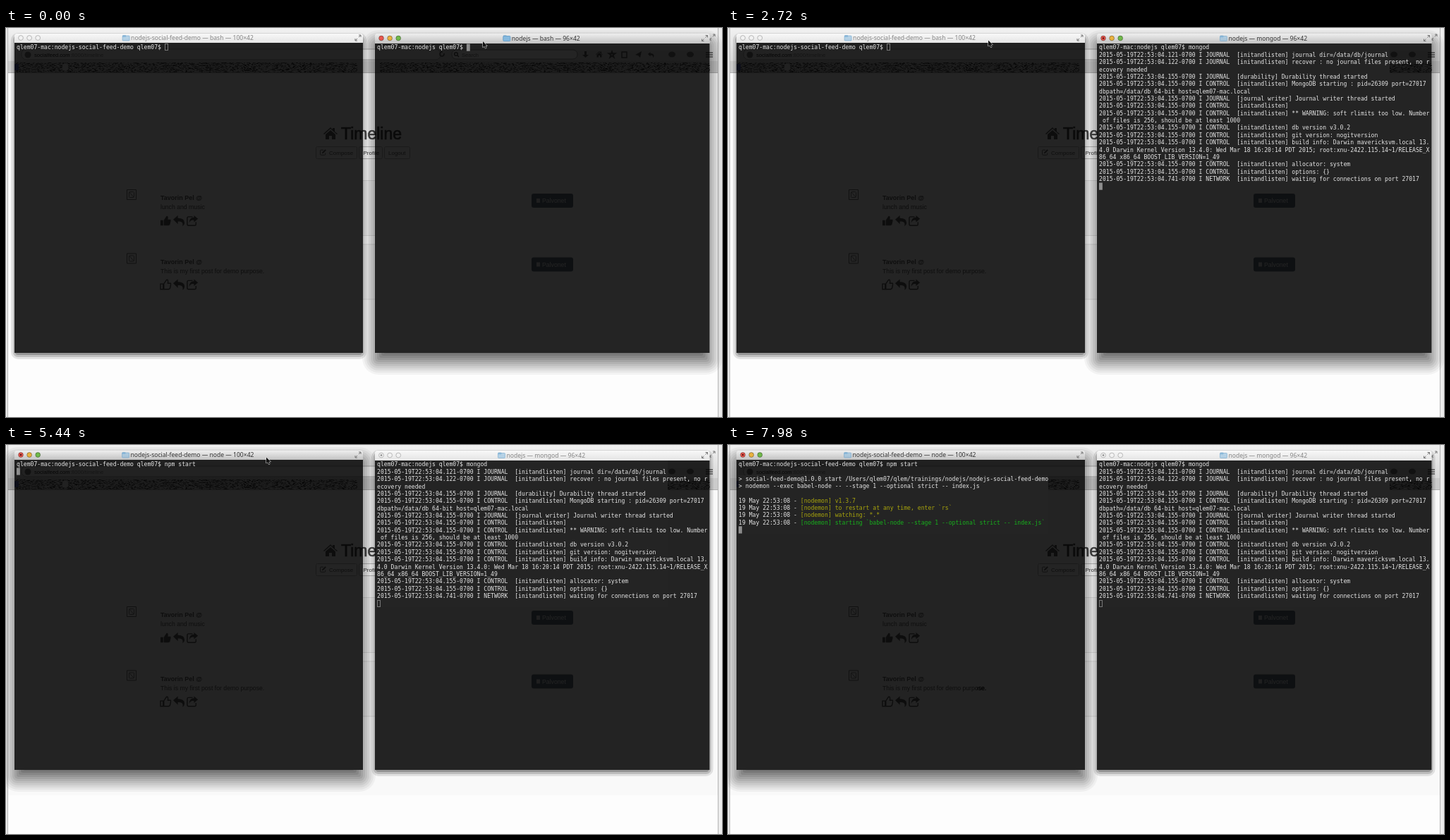
An HTML page with a canvas for the animation above (8000 ms loop, 1015 by 552 pixels).

```html
<!DOCTYPE html>
<html lang="en">
<head>
<meta charset="utf-8">
<title>Starting the demo</title>
<style>
  html, body { margin: 0; width: 100%; height: 100%; overflow: hidden; }
  canvas { display: block; }
</style>
</head>
<body>
<canvas id="stage" width="1015" height="552"></canvas>
<script>
const g = document.getElementById('stage').getContext('2d');
const LOOP = 8000, CELL = 4.88, ROW = 10.37, INK = '#5c5c5c';
const SANS = '"Liberation Sans", sans-serif';
const UI = '"Noto Sans", sans-serif';
const MONO = '8.1px "DejaVu Sans Mono", monospace';
const LEFT = { x: 12, w: 494, text: 15, y: 0 };
const RIGHT = { x: 523, w: 474.5, text: 526, y: 0.5 };
const TOP = 8, BOTTOM = 461;

// ---------- helpers ----------
function box(x, y, w, h, color) {
  g.fillStyle = color;
  g.fillRect(x, y, w, h);
}
function rounded(x, y, w, h, r, fill, stroke) {
  g.beginPath();
  g.roundRect(x, y, w, h, r);
  if (fill) { g.fillStyle = fill; g.fill(); }
  if (stroke) { g.strokeStyle = stroke; g.lineWidth = 1; g.stroke(); }
}
function label(str, x, y, font, color = INK, align = 'left') {
  g.font = font;
  g.fillStyle = color;
  g.textAlign = align;
  g.fillText(str, x, y);
}
function icon(d, x, y, scale, outline) {
  g.save();
  g.translate(x, y);
  g.scale(scale, scale);
  g.fillStyle = g.strokeStyle = INK;
  g.lineWidth = 1.5;
  g[outline ? 'stroke' : 'fill'](new Path2D(d));
  g.restore();
}
function vertical(y0, y1, from, to) {
  const fill = g.createLinearGradient(0, y0, 0, y1);
  fill.addColorStop(0, from);
  fill.addColorStop(1, to);
  return fill;
}
function mono(str, win, col, row, color) {
  g.font = MONO;
  g.fillStyle = color;
  g.textAlign = 'left';
  [...str].forEach((ch, i) =>
    ch !== ' ' && g.fillText(ch, win.text + (col + i) * CELL, 29.9 + win.y + row * ROW));
}

// ---------- browser page behind the terminals ----------
const ICONS = {
  house: 'M0 9L10 0l3 3V1h3v5l4 3-1 1-9-8-9 8zM3 10l7-6 7 6v7h-5v-5H8v5H3z',
  thumb: 'M0 7h4v8H0zM5 7l4-6q3-1 2 5h4q1 1-1 8l-2 1H5z',
  reply: 'M0 6l7-6v4q10 0 10 7q0 3-3 5q2-8-7-7v4z',
  frame: 'M9 2H3Q1 2 1 4v9q0 2 2 2h9q2 0 2-2v-3',
  arrow: 'M17 5l-6-5v3q-7 0-7 8q2-5 7-4v3z',
  pencil: 'M4 8l6-6 2 2-6 6-3 1z'
};

const speckle = document.createElement('canvas');
speckle.width = 490;
speckle.height = 14;
{
  const s = speckle.getContext('2d');
  let seed = 7;
  const random = () => (seed = seed * 16807 % 2147483647) / 2147483647;
  for (let i = 0; i < 3400; i++) {
    s.fillStyle = `rgba(0,0,0,${random() * 0.55})`;
    s.fillRect(random() * 490 | 0, random() * 14 | 0, 2, 1);
  }
}

function drawChrome() {
  box(2, 0, 1008, 47, vertical(0, 47, '#f1f1f1', '#d8d8d8'));
  box(2, 47, 1008, 16.5, '#cbcbcb');
  box(2, 63, 1008, 1, '#b0b0b0');
  rounded(22, 30, 594, 15, 7, '#f4f4f4', '#aaa');
  rounded(632, 31, 178, 13, 6, '#fff', '#999');
  g.beginPath();
  g.arc(31, 38, 4.5, 0, 7);
  g.fillStyle = '#777';
  g.fill();
  label('socialfeed.com', 40, 41, '7.6px ' + SANS, '#222');
  label(':8000/timeline', 91, 41, '7.6px ' + SANS, '#888');
  label('Search', 646, 41, '7.6px ' + SANS, '#777');
  g.strokeStyle = INK;
  g.lineWidth = 1.5;
  g.beginPath();
  g.arc(638, 37, 2.3, 0, 7);
  g.moveTo(640, 39); g.lineTo(642, 41);
  g.moveTo(621, 36); g.arc(618, 37, 3, 0, 5);
  g.moveTo(859, 33); g.lineTo(862, 42); g.lineTo(854, 36); g.lineTo(864, 36); g.lineTo(856, 42); g.closePath();
  g.moveTo(873, 34); g.rect(873, 34, 7, 8);
  for (let y = 35; y < 42; y += 3) { g.moveTo(992, y); g.lineTo(1002, y); }
  g.stroke();
  icon('M3 0h3v5h3L4.5 9 0 5h3z', 817, 33, 1);
  icon(ICONS.house, 836, 33, 0.5);
  icon('M0 5l9-5-2 9-3-3z', 892, 33, 1);
  icon(ICONS.reply, 910, 34, 0.5);
  for (const x of [944, 970]) {
    g.beginPath();
    g.ellipse(x, 37.5, 5, 4, 0, 0, 7);
    g.fillStyle = '#777';
    g.fill();
  }
  g.drawImage(speckle, 14, 49, 484, 14);
  g.drawImage(speckle, 530, 49, 468, 14);
  rounded(12, 51, 6, 9, 1, '#5662b0');
  rounded(80, 51, 8, 9, 2, '#eee');
}

function drawPost(y, message, outlined) {
  // the panel only shows between the two terminals
  box(506, y, 17, 79, '#ddd');
  box(506, y + 1, 17, 77, '#f3f3f3');
  rounded(171.5, y + 13.5, 13, 14, 0, null, '#777');
  rounded(174.5, y + 16.5, 7, 8, 1, null, '#888');
  g.beginPath();
  g.moveTo(175, y + 17); g.lineTo(181, y + 24);
  g.stroke();
  label('Tavorin Pel @', 219, y + 28, 'bold 9px ' + SANS);
  label(message, 219, y + 41, '8.7px ' + SANS);
  icon(ICONS.thumb, 219, y + 50, 0.95, outlined);
  icon(ICONS.reply, 237, y + 50, 0.95);
  icon(ICONS.frame, 256, y + 50, 0.95, true);
  icon(ICONS.arrow, 256, y + 50, 0.95);
  rounded(745, y + 19, 59, 20, 3, '#667480');
  box(752, y + 26, 5, 6, '#ddd');
  label('Palvonet', 760, y + 32, '8.7px ' + SANS, '#fff');
}

const POST = 'This is my first post for demo purpose.';

function drawPage(t) {
  box(0, 0, 1015, 552, '#ececec');
  box(2, 0, 1008, 552, '#fdfdfd');
  if (t >= 3170) box(2, 64, 1008, 433, '#f9f9f9');
  drawChrome();
  icon(ICONS.house, 450, 141, 1);
  label('Timeline', 475, 158, '23px ' + SANS, '#444');
  g.strokeStyle = '#444';
  g.lineWidth = 0.7;
  g.strokeText('Timeline', 475, 158);
  rounded(439.5, 168.5, 58, 17, 2, '#fff', '#bbb');
  rounded(500.5, 168.5, 33, 17, 2, '#fff', '#bbb');
  rounded(536.5, 168.5, 36, 17, 2, '#fff', '#bbb');
  icon(ICONS.frame, 445, 172, 0.55, true);
  icon(ICONS.pencil, 446, 171, 0.65);
  label('Compose', 458, 180, '8px ' + SANS);
  label('Profile', 506.5, 180, '8px ' + SANS, '#333');
  label('Logout', 542, 180, '8px ' + SANS);
  drawPost(216, 'lunch and music');
  drawPost(306.5, POST, true);
  // freshly printed output hides what shines through
  if (t >= 1670) box(524, 22, 414, 208, '#fdfdfd');
  if (t >= 5740) box(15, 43, 439, 83, '#fdfdfd');
  g.strokeStyle = '#b4b4b4';
  g.lineWidth = 1;
  g.strokeRect(2.5, -4.5, 1007, 570);
  expandIcon(1001, 13);
}

// ---------- terminal windows ----------
function expandIcon(x, y) {
  g.strokeStyle = '#777';
  g.lineWidth = 1;
  g.beginPath();
  for (const s of [1, -1]) {
    g.moveTo(x + s, y - s); g.lineTo(x + 4 * s, y - 4 * s);
    g.moveTo(x + s, y - 4 * s); g.lineTo(x + 4 * s, y - 4 * s); g.lineTo(x + 4 * s, y - s);
  }
  g.stroke();
}

// stacked rounded bands that get denser towards the window
function drawShadow({ x, w }, spread, drop, alpha) {
  const h = BOTTOM - TOP;
  g.save();
  g.beginPath();
  g.rect(0, 0, 1015, 552);
  g.roundRect(x, TOP, w, h, [4, 4, 0, 0]);
  g.clip('evenodd');
  for (let d = spread; d > -drop; d -= 3)
    rounded(x - d, TOP + drop - d, w + 2 * d, h + 2 * d, Math.max(3, d + 5),
      `rgba(0,0,0,${alpha * (2 - d / spread)})`);
  g.restore();
}

function drawWindow(win, title, active, running) {
  const { x, w } = win, middle = 14 + win.y, body = Math.round(21 + win.y);
  if (active) drawShadow(win, 18, 13, 0.04);
  else drawShadow(win, 5, 4, 0.1);
  box(x, body, w, BOTTOM - body, 'rgba(0,0,0,0.86)');
  rounded(x, TOP, w, body - TOP, [4, 4, 0, 0],
    active ? vertical(TOP, body, '#eeeeee', '#c2c2c2') : vertical(TOP, body, '#f8f8f8', '#e4e4e4'));

  const lights = active ? ['#e8574e', '#eab23f', '#70b94a'] : ['#f2f2f2', '#f2f2f2', '#f2f2f2'];
  lights.forEach((color, i) => {
    g.beginPath();
    g.arc(x + 9 + i * 12.1, middle, 3.4, 0, 7);
    g.fillStyle = color;
    g.fill();
    g.strokeStyle = active ? 'rgba(0,0,0,.4)' : '#aaa';
    g.lineWidth = 0.8;
    g.stroke();
  });
  if (running) {
    g.beginPath();
    g.arc(x + 9, middle, 1.3, 0, 7);
    g.fillStyle = active ? '#5a1410' : '#888';
    g.fill();
  }

  const center = x + w / 2 + 5;
  label(title, center, middle + 3, '8.57px ' + UI, active ? '#333' : '#858585', 'center');
  const iconX = center - g.measureText(title).width / 2 - 12;
  g.globalAlpha = active && !running ? 1 : 0.55;
  rounded(iconX, middle - 4, 5, 3, 1, '#5f9cc9');
  rounded(iconX, middle - 3, 10, 7, 1, '#86b9de', '#6aa2cc');
  g.globalAlpha = 1;
  expandIcon(x + w - 7, middle);
}

function drawCaret(win, col, row, active) {
  const x = win.text + col * CELL, y = 22 + win.y + row * ROW;
  if (active) return box(x, y, CELL, 10.2, '#8c8c8c');
  g.strokeStyle = '#777';
  g.lineWidth = 1;
  g.strokeRect(Math.round(x) + 0.5, Math.round(y) + 0.5, 4, 9);
}

// ---------- terminal contents ----------
const USER = 'qlem07', HOST = USER + '-mac';
const prompt = dir => `${HOST}:${dir} ${USER}$ `;
const log = (ms, kind, message, thread = 'initandlisten') =>
  `2015-05-19T22:53:04.${ms}-0700 I ${kind}  [${thread}] ${message}`.match(/.{1,96}/g);

const MONGO = [
  log(121, 'JOURNAL', 'journal dir=/data/db/journal'),
  log(122, 'JOURNAL', 'recover : no journal files present, no recovery needed'),
  log(155, 'JOURNAL', 'Durability thread started', 'durability'),
  log(155, 'CONTROL', `MongoDB starting : pid=26309 port=27017 dbpath=/data/db 64-bit host=${HOST}.local`),
  log(155, 'JOURNAL', 'Journal writer thread started', 'journal writer'),
  log(155, 'CONTROL', ''),
  log(155, 'CONTROL', '** WARNING: soft rlimits too low. Number of files is 256, should be at least 1000'),
  log(155, 'CONTROL', 'db version v3.0.2'),
  log(155, 'CONTROL', 'git version: nogitversion'),
  log(155, 'CONTROL', 'build info: Darwin mavericksvm.local 13.4.0 Darwin Kernel Version 13.4.0: ' +
    'Wed Mar 18 16:20:14 PDT 2015; root:xnu-2422.115.14~1/RELEASE_X86_64 x86_64 BOOST_LIB_VERSION=1_49'),
  log(155, 'CONTROL', 'allocator: system'),
  log(155, 'CONTROL', 'options: {}'),
  log(741, 'NETWORK', 'waiting for connections on port 27017')
].flat();

const NPM = [
  '',
  `> social-feed-demo@1.0.0 start /Users/${USER}/qlem/trainings/nodejs/nodejs-social-feed-demo`,
  '> nodemon --exec babel-node -- --stage 1 --optional strict -- index.js',
  ''
];
const NODEMON = [
  'v1.3.7',
  'to restart at any time, enter `rs`',
  'watching: *.*',
  'starting `babel-node --stage 1 --optional strict -- index.js`'
];
const WHITE = '#e6e6e6';

// keys: [time, value], each held until the next
const held = (keys, t) => keys.filter(k => t >= k[0]).pop()[1];

function drawRight(t, active) {
  const running = t >= 1670;
  drawWindow(RIGHT, `nodejs — ${running ? 'mongod' : 'bash'} — 96×42`, active, running);
  const line = prompt('nodejs') + 'mongod'.slice(0, held([[0, 0], [900, 5], [1220, 6]], t));
  const count = held([[0, 0], [1670, MONGO.length - 1], [2270, MONGO.length]], t);
  mono(line, RIGHT, 0, 0, WHITE);
  MONGO.slice(0, count).forEach((text, i) => mono(text, RIGHT, 0, i + 1, WHITE));
  if (t < 1520) drawCaret(RIGHT, line.length, 0, active);
  else drawCaret(RIGHT, 0, count + 1, active);
}

function drawLeft(t, active) {
  const running = t >= 5440;
  drawWindow(LEFT, `nodejs-social-feed-demo — ${running ? 'node' : 'bash'} — 100×42`, active, running);
  const typed = held([[0, 0], [3770, 1], [3920, 2], [4070, 3], [4220, 4], [4400, 5],
    [4700, 6], [4850, 8], [5000, 9]], t);
  const line = prompt('nodejs-social-feed-demo') + 'npm start'.slice(0, typed);
  mono(line, LEFT, 0, 0, WHITE);
  if (t < 5290) return drawCaret(LEFT, line.length, 0, active);
  let row = 1;
  if (t >= 5740) for (const text of NPM) mono(text, LEFT, 0, row++, WHITE);
  const stamp = '19 May 22:53:08 - ';
  NODEMON.slice(0, held([[0, 0], [6190, 3], [6340, 4]], t)).forEach((text, i) => {
    mono(stamp, LEFT, 0, row, WHITE);
    mono('[nodemon] ' + text, LEFT, stamp.length, row++, i < 3 ? '#a9a50c' : '#17b01c');
  });
  drawCaret(LEFT, 0, row, active);
}

// ---------- pointer ----------
const PATH = [
  [0, 676, 19], [1670, 676, 19], [1970, 610, 27], [2420, 381, 38], [2720, 369, 17.5],
  [5740, 369, 17.5], [6340, 370, 50], [6770, 357, 273], [7520, 381, 491], [7970, 430, 563]
];

function drawPointer(t) {
  const q = Math.max(0, Math.floor((t - 20) / 150) * 150 + 20);
  const next = Math.max(1, PATH.findIndex(k => k[0] > q));
  const [a, b] = q >= 7970 ? PATH.slice(-2) : [PATH[next - 1], PATH[next]];
  const f = Math.min(1, (q - a[0]) / (b[0] - a[0]));
  const x = a[1] + (b[1] - a[1]) * f, y = a[2] + (b[2] - a[2]) * f;
  g.save();
  g.translate(x, y);
  g.lineWidth = 1;
  if (y > 22 && y < BOTTOM) {
    g.strokeStyle = '#b5b5b5';
    g.stroke(new Path2D('M-2.5-4.5Q0-4.5 0-3Q0-4.5 2.5-4.5M0-3.5V4M-2.5 5Q0 5 0 3.5Q0 5 2.5 5M-1.5 1.5h3'));
  } else {
    const shape = new Path2D('M0 0v8.5l2-1.8 1.5 3.3 1.5-.7-1.5-3.1h2.7z');
    g.strokeStyle = '#eee';
    g.stroke(shape);
    g.fillStyle = '#111';
    g.fill(shape);
  }
  g.restore();
}

// ---------- loop ----------
function draw(now) {
  const t = now % LOOP, leftActive = t >= 3170;
  drawPage(t);
  if (leftActive) {
    drawRight(t, false);
    drawLeft(t, true);
  } else {
    drawLeft(t, false);
    drawRight(t, true);
  }
  if (t >= 7080) {
    // the passing pointer leaves the end of the post darker
    g.save();
    g.beginPath();
    g.rect(353, 338, 33, 14);
    g.clip();
    label(POST, 219, 347.5, '8.7px ' + SANS, '#000');
    g.restore();
  }
  drawPointer(t);
  requestAnimationFrame(draw);
}
requestAnimationFrame(draw);
</script>
</body>
</html>
```
